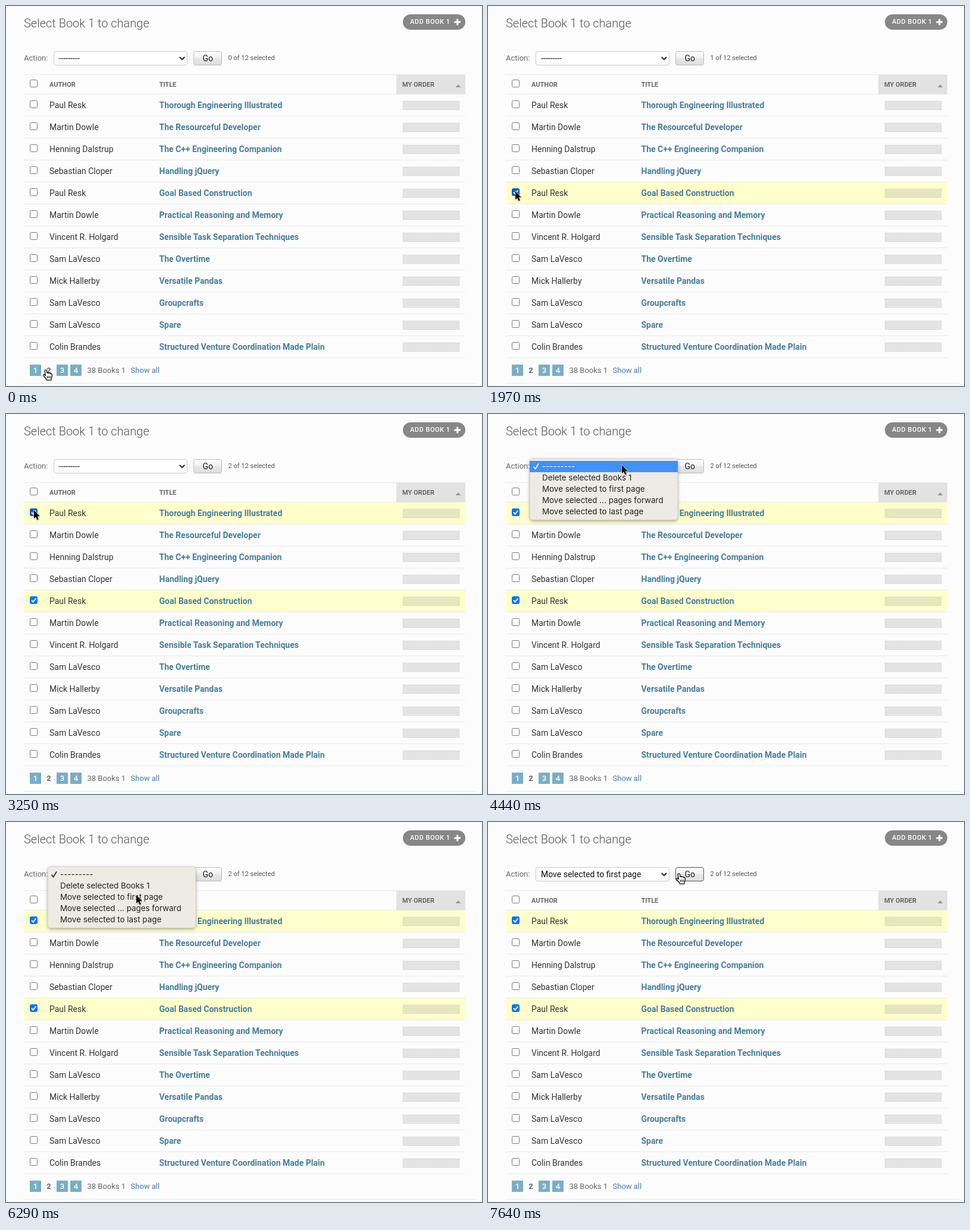
Animation, 800 px wide and 640 px high, one loop 8 s. Source, as an HTML page:

```html
<!DOCTYPE html>
<html lang="en">
<head>
<meta charset="utf-8">
<title>Change list</title>
<style>
html, body { margin: 0; width: 100%; height: 100%; overflow: hidden; background: #fcfcfc; }
svg { display: block; width: 800px; height: 640px; font: 14px Roboto, sans-serif; }
text { white-space: pre; }
.small { font-size: 13px; fill: #666; }
.head { font-size: 11px; font-weight: 700; fill: #666; }
.link { font-weight: 700; fill: #447e9b; }
.item { font: 13.4px Inter, sans-serif; }
</style>
</head>
<body>
<svg id="stage" viewBox="0 0 800 640">
  <defs>
    <pattern id="dots" x="667" y="160" width="2" height="2" patternUnits="userSpaceOnUse">
      <rect width="1" height="1" fill="#999" shape-rendering="crispEdges"/>
    </pattern>
    <linearGradient id="btn" x1="0" y1="0" x2="0" y2="1">
      <stop offset="0" stop-color="#fff"/>
      <stop offset=".5" stop-color="#f0f0f0"/>
      <stop offset=".5" stop-color="#e7e7e7"/>
      <stop offset="1" stop-color="#dedede"/>
    </linearGradient>
    <filter id="shade" x="-10%" y="-20%" width="120%" height="150%">
      <feDropShadow dx="0" dy="2" stdDeviation="2.5" flood-opacity=".32"/>
    </filter>
    <filter id="soft" x="-50%" y="-50%" width="200%" height="200%">
      <feDropShadow dx="0" dy="1" stdDeviation=".8" flood-opacity=".3"/>
    </filter>
  </defs>
</svg>
<script>
const LOOP = 8000;
const stage = document.getElementById('stage');

const books = [
  ['Paul Resk', 'Thorough Engineering Illustrated'],
  ['Martin Dowle', 'The Resourceful Developer'],
  ['Henning Dalstrup', 'The C++ Engineering Companion'],
  ['Sebastian Cloper', 'Handling jQuery'],
  ['Paul Resk', 'Goal Based Construction'],
  ['Martin Dowle', 'Practical Reasoning and Memory'],
  ['Vincent R. Holgard', 'Sensible Task Separation Techniques'],
  ['Sam LaVesco', 'The Overtime'],
  ['Mick Hallerby', 'Versatile Pandas'],
  ['Sam LaVesco', 'Groupcrafts'],
  ['Sam LaVesco', 'Spare'],
  ['Colin Brandes', 'Structured Venture Coordination Made Plain']
];
const options = ['---------', 'Delete selected Books 1', 'Move selected to first page',
  'Move selected ... pages forward', 'Move selected to last page'];

// Pointer moves: start, end, number of steps, points on the way
const moves = [
  [180, 980, 15, [[67, 613], [74, 604], [104, 580], [150, 550], [196, 515], [220, 478], [213, 446],
    [188, 413], [153, 346], [118, 293], [92, 262], [68, 255], [44, 268], [31, 286]]],
  [1040, 1440, 8, [[31, 286], [30, 292], [37, 303], [44, 310], [46, 311]]],
  [1670, 1670, 1, [[46, 311], [46, 312]]],
  [2090, 2440, 7, [[46, 312], [50, 290], [57, 243], [59, 212], [59, 201]]],
  [2500, 2950, 9, [[59, 201], [57, 185], [51, 169], [48, 163], [47, 162]]],
  [3550, 4020, 9, [[47, 162], [80, 143], [152, 108], [205, 91], [225, 86]]],
  [5400, 5870, 9, [[225, 86], [223.5, 102], [222, 114], [220, 120], [219, 123]]],
  [6640, 7040, 8, [[219, 123], [240, 115], [284, 99], [313, 89], [321, 88]]],
  [7100, 7100, 1, [[321, 88], [321, 87]]]
];

function add(name, attrs = {}, parent = stage) {
  const el = document.createElementNS('http://www.w3.org/2000/svg', name);
  return set(el, attrs), parent.append(el), el;
}
function set(el, attrs) {
  for (const k in attrs) el.setAttribute(k, attrs[k]);
}
function rect(x, y, width, height, fill, more, parent) {
  return add('rect', { x, y, width, height, fill, ...more }, parent);
}
function text(str, x, y, attrs, parent) {
  const el = add('text', { x, y, fill: '#333', ...attrs }, parent);
  el.textContent = str;
  return el;
}
function show(el, on) {
  el.style.display = on ? '' : 'none';
}
function checkbox(y) {
  const box = rect(40.5, y + .5, 12, 12, '#fff', { rx: 2, stroke: '#767676' });
  const tick = add('path', { d: `M43 ${y + 6.8}l2.6 2.7 4.8-6`, fill: 'none', stroke: '#fff', 'stroke-width': 2 });
  show(tick, false);
  return { y, paint(on, hover, press) {
    const blue = hover ? '#005cc8' : '#0075ff';
    set(box, { fill: on ? blue : press ? '#dedede' : '#fff', stroke: on ? blue : hover ? '#4f4f4f' : '#767676' });
    show(tick, on);
  } };
}

// Title and add button
text('Select Book 1 to change', 30, 36, { 'font-size': 20, 'font-weight': 300, fill: '#555' });
rect(667, 14, 105, 26, '#878787', { rx: 13 });
text('ADD BOOK 1', 679, 30, { 'font-size': 11, 'font-weight': 500, 'letter-spacing': .5, fill: '#fff' });
add('path', { d: 'M753.5 27h10.5M758.75 21.8v10.5', stroke: '#fff', 'stroke-width': 3 });

// Action bar
text('Action:', 30, 92, { class: 'small' });
const select = rect(80.5, 76.5, 224, 23, '#fff', { rx: 3.5 });
const value = text('', 89, 93, { fill: '#111' });
add('path', { d: 'M291.8 86l4.2 4.2 4.2-4.2', fill: 'none', stroke: '#222', 'stroke-width': 2 });
const go = rect(315.5, 76.5, 47, 23, 'url(#btn)', { rx: 3.5 });
text('Go', 330.5, 93.2, { fill: '#222' });
const count = text('', 373.5, 91, { 'font-size': 11, fill: '#555' });

// Table
rect(30, 115, 742, 1, '#ebebeb');
rect(656, 116, 116, 32, '#e2e2e2');
rect(30, 148, 742, 1, '#e8e8e8');
checkbox(124);
text('AUTHOR', 73, 136, { class: 'head' });
text('TITLE', 257.5, 136, { class: 'head' });
text('MY ORDER', 666, 136, { class: 'head' });
add('path', { d: 'M755.5 137h9l-4.5-5z', fill: '#999' });

const rows = books.map(([author, title], i) => {
  const y = 149 + 37 * i;
  const back = rect(30, y, 742, 36, '#ffffcc');
  rect(30, y + 36, 742, 1, '#e8e8e8');
  text(author, 73, y + 23);
  text(title, 257.5, y + 23, { class: 'link' });
  add('rect', { x: 667, y: 160, width: 96, height: 16, fill: 'url(#dots)', transform: `translate(0 ${37 * i})` });
  return { back, box: checkbox(y + 10) };
});

// Pages
[[1, 40], [3, 85], [4, 108]].forEach(([n, x]) => {
  rect(x, 604, 19, 19, '#79aec8');
  text(n, x + 9.5, 618, { 'font-size': 13, 'font-weight': 500, 'text-anchor': 'middle', fill: '#fff' });
});
text('2', 72, 618, { class: 'small', 'font-weight': 700, 'text-anchor': 'middle' });
text('38 Books 1', 136.5, 618, { class: 'small' });
text('Show all', 209.5, 618, { 'font-size': 13, fill: '#447e9b' });
rect(30, 635, 762, 1, '#ebebeb');

// Menu
const menu = add('g');
rect(70, 75, 249, 103.5, '#edebe3', { rx: 5.5, stroke: '#b9b8b2', 'stroke-width': .6, filter: 'url(#shade)' }, menu);
const bar = rect(70, 79, 249, 19, '#4191f6', {}, menu);
const items = options.map((str, i) => text(str, 91, 93 + 19 * i, { class: 'item' }, menu));
const mark = add('path', { d: 'M76.5 88.8l3 3.7 5.6-9', fill: 'none', 'stroke-width': 1.6 }, menu);

// Pointers
const arrow = add('path', {
  d: 'M0 0V14L3.2 11.2 5.5 16.4 7.9 15.3 5.7 10.3H10Z',
  fill: '#000', stroke: '#fff', 'stroke-width': 1.1, 'paint-order': 'stroke', filter: 'url(#soft)'
});
const hand = add('g', { filter: 'url(#soft)' });
add('path', {
  d: 'M-1.7 1.2C-1.8-.6 1-.7 1.4 1L2.2 5.3C2.5 4.3 4.8 4.2 5.1 5.8 5.6 4.8 7.6 5 7.9 6.6 8.5 5.9 10.2 6.2 10.3 8 10.5 10.5 9.6 12.5 9 14.2L8.8 17H1.4L.9 15.2C-.8 13.5-2.4 11.4-4 9.6-5 8.2-3.2 7-1.8 8.3L-.6 9.6Z',
  fill: '#fff', stroke: '#000', 'stroke-width': 1.2, 'stroke-linejoin': 'round'
}, hand);
add('path', { d: 'M2.4 10v4M4.8 10v4M7.2 10v4', stroke: '#000' }, hand);

// Smooth curve through the points, u from 0 to 1
function along(pts, u) {
  const last = pts.length - 1;
  const i = Math.min(last - 1, Math.floor(u * last));
  const f = u * last - i;
  const p = k => pts[Math.max(0, Math.min(last, i + k))];
  return [0, 1].map(c => {
    const a = p(-1)[c], b = p(0)[c], d = p(1)[c], e = p(2)[c];
    return b + f * (d - a + f * (2 * a - 5 * b + 4 * d - e + f * (3 * (b - d) + e - a))) / 2;
  });
}
function pointer(t) {
  const move = moves.filter(m => m[0] <= t).pop();
  if (!move) return moves[0][3][0];
  const [start, end, n, pts] = move;
  const k = end > start ? Math.floor((t - start) / (end - start) * (n - 1) + 1e-6) + 1 : n;
  return along(pts, Math.min(1, k / n));
}

function draw(t) {
  const [x, y] = pointer(t);
  const checked = { 0: t >= 3250, 4: t >= 1970 };
  const pressed = { 0: t >= 3130, 4: t >= 1850 };
  rows.forEach(({ back, box }, i) => {
    const hover = x >= 40 && x < 53 && y >= box.y && y < box.y + 13;
    show(back, checked[i]);
    box.paint(!!checked[i], hover, pressed[i]);
  });
  count.textContent = `${checked[0] + checked[4]} of 12 selected`;

  const overGo = x >= 315 && x < 363 && y >= 76 && y < 100;
  value.textContent = options[t < 6640 ? 0 : 2];
  set(select, { stroke: t >= 4440 && t < 7640 ? '#555' : '#c9c9c9' });
  set(go, { stroke: overGo ? '#555' : '#bbb' });

  show(menu, t >= 4440 && t < 6580);
  set(menu, { opacity: t < 6410 ? 1 : t < 6470 ? .75 : .35 });
  const flash = t >= 6290 && t < 6350;
  const active = flash ? -1 : y < 98 ? 0 : y < 117 ? 1 : 2;
  show(bar, active >= 0);
  set(bar, { y: 79 + 19 * active });
  items.forEach((el, i) => set(el, { fill: i === active ? '#fff' : '#222' }));
  set(mark, { stroke: active === 0 ? '#fff' : '#222' });

  const isHand = overGo || (y > 603 && x < 82);
  show(arrow, !isHand);
  show(hand, isHand);
  set(isHand ? hand : arrow, { transform: `translate(${x.toFixed(1)} ${y.toFixed(1)})` });
}

function tick() {
  draw(performance.now() % LOOP);
  requestAnimationFrame(tick);
}
tick();
</script>
</body>
</html>
```
